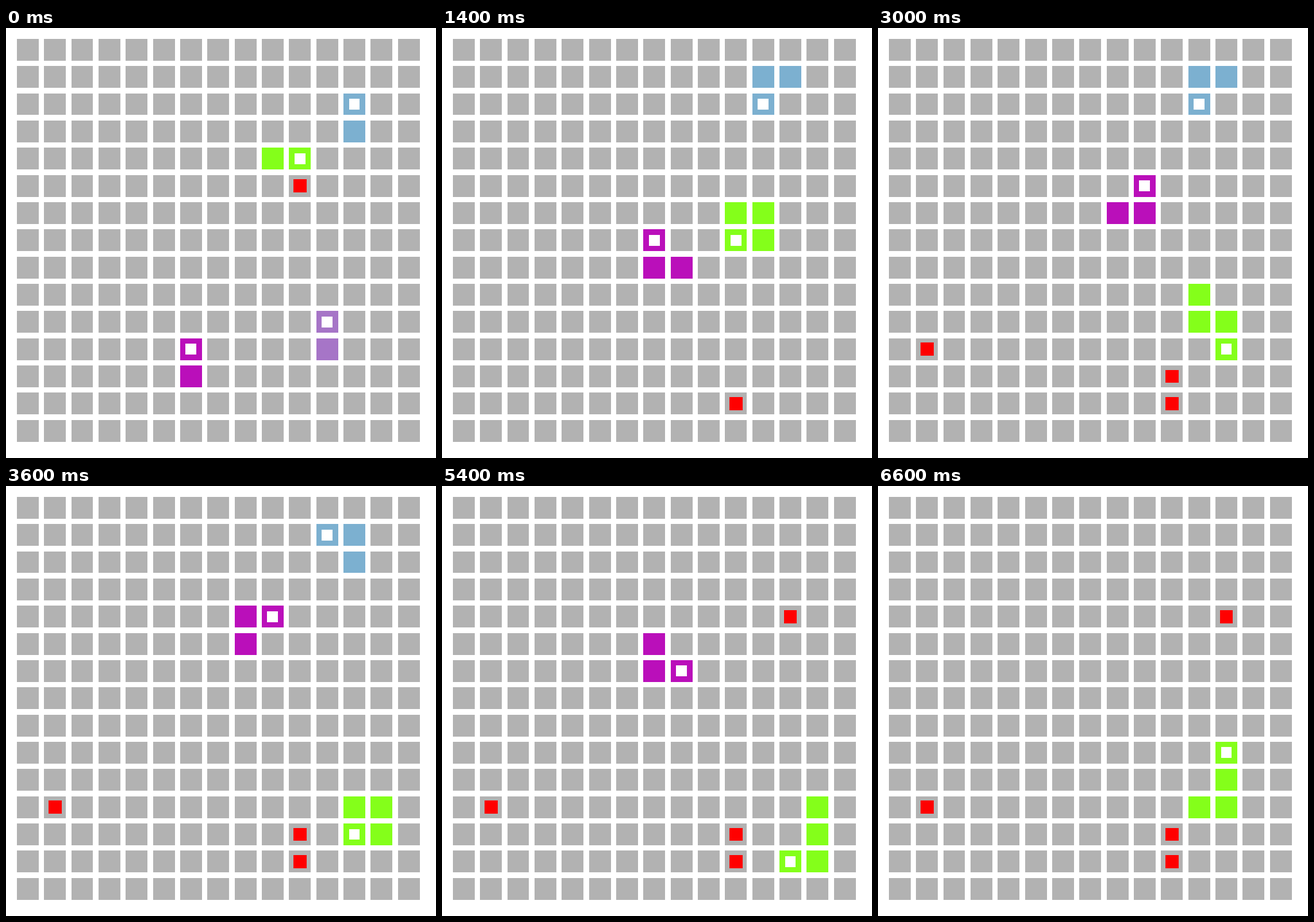
Animation, 748 px wide and 748 px high, one loop 6800 ms. Source, as an HTML page with a canvas:

```html
<!DOCTYPE html>
<html lang="en">
<head>
<meta charset="utf-8">
<title>Snakes</title>
<style>
  html, body { margin: 0; width: 100%; height: 100%; overflow: hidden; background: #fff; }
  canvas { display: block; }
</style>
</head>
<body>
<canvas id="board" width="748" height="748"></canvas>
<script>
const ctx = document.getElementById('board').getContext('2d');
const STEP = 200, STEPS = 34, CELLS = 15;
const UNIT = 748 / 79; // margin 2, cell 4, gap 1
const MOVES = { U: [0, -1], D: [0, 1], L: [-1, 0], R: [1, 0] };

// A snake is on the board for as long as it has moves left.
const snakes = [
  { color: '#7cb0d0', start: [12, 3], length: 3, moves: 'URUULDLDLDRURULDRULDRULU' },
  { color: '#84ff1a', start: [9, 4], length: 4, moves: 'RDDDRULDLDRDRDRDRDLDLURURDDLULURUU' },
  { color: '#a675c7', start: [11, 11], length: 3, moves: 'URULU' },
  { color: '#ba0fba', start: [6, 12], length: 3, moves: 'UURURULULURDRURULURDLDLLURDRDRUL' }
];

const food = [
  { at: [10, 5], from: 0, to: 1 },
  { at: [10, 13], from: 1, to: STEPS },
  { at: [10, 12], from: 10, to: STEPS },
  { at: [1, 11], from: 14, to: STEPS },
  { at: [12, 4], from: 26, to: STEPS }
];

for (const s of snakes) {
  s.path = [s.start];
  for (const m of s.moves) {
    const [x, y] = s.path[s.path.length - 1];
    s.path.push([x + MOVES[m][0], y + MOVES[m][1]]);
  }
}

// Square centred in a cell, edges snapped to whole pixels.
function square([col, row], size, color) {
  const edge = (i, d) => Math.round((4 + i * 5 + d) * UNIT);
  const x = edge(col, -size / 2), y = edge(row, -size / 2);
  ctx.fillStyle = color;
  ctx.fillRect(x, y, edge(col, size / 2) - x, edge(row, size / 2) - y);
}

function draw(step) {
  ctx.fillStyle = '#fff';
  ctx.fillRect(0, 0, 748, 748);
  for (let row = 0; row < CELLS; row++)
    for (let col = 0; col < CELLS; col++) square([col, row], 4, '#b2b2b2');

  for (const f of food)
    if (step >= f.from && step < f.to) square(f.at, 2.4, '#f00');

  for (const s of snakes) {
    if (step >= s.moves.length) continue;
    const head = step + 1;
    const body = s.path.slice(Math.max(0, head + 1 - s.length), head + 1);
    for (const cell of body) square(cell, 4, s.color);
    square(s.path[head], 2, '#fff');
  }
}

let shown = -1;
const origin = performance.now();
function tick() {
  const step = Math.floor((performance.now() - origin) / STEP) % STEPS;
  if (step !== shown) draw(shown = step);
  requestAnimationFrame(tick);
}
tick();
</script>
</body>
</html>
```
